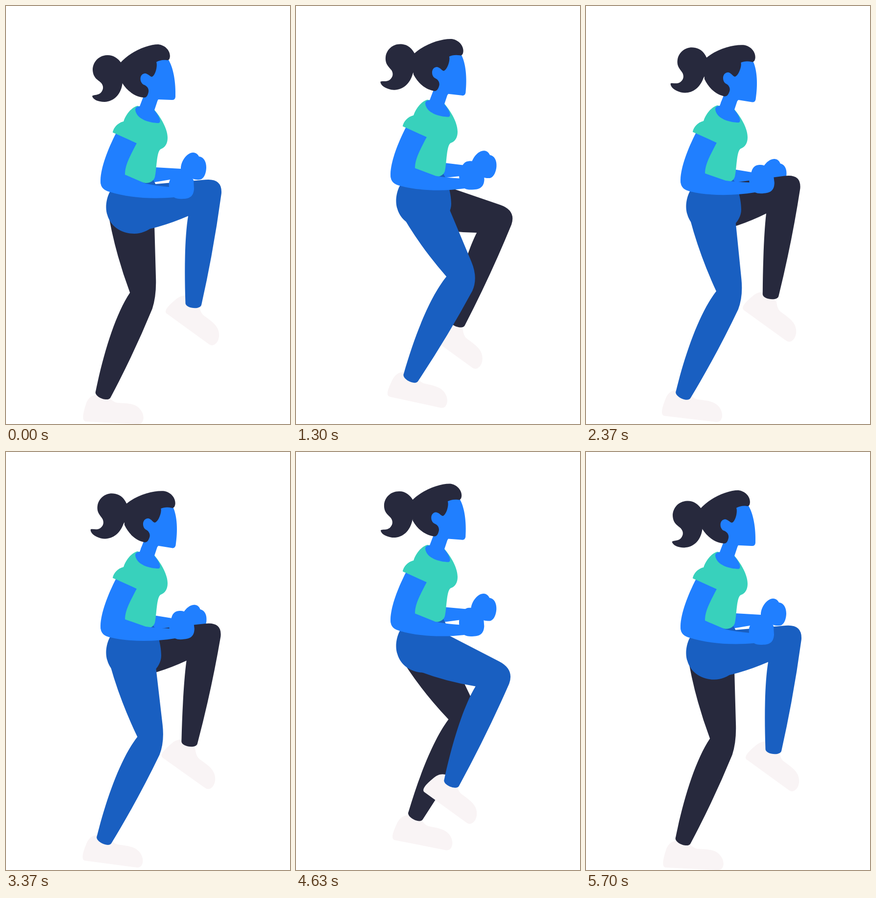
An HTML page for the animation above (5730 ms loop, 580 by 850 pixels).

```html
<!DOCTYPE html>
<html lang="en">
<head>
<meta charset="utf-8">
<title>High knees</title>
<style>
  html, body { margin: 0; width: 100%; height: 100%; overflow: hidden; background: #fff; }
  svg { display: block; width: 580px; height: 850px; }
  .ink { fill: #27293d; }
  .skin { fill: #207fff; }
  .pants { fill: #195fc1; }
  .shirt { fill: #38d1bc; }
  .shoe { fill: #f9f4f5; }
</style>
</head>
<body>
<svg viewBox="0 0 580 850">
  <defs>
    <path id="shoe" d="M-36 43C-44 42 -43 30 -36 8C-33 -2 -26 -10 -16 -11L10 -8C16 -2 20 4 30 5C48 6 62 6 72 15C81 23 83 34 81 40Q79 49 68 48Z"/>
  </defs>
  <g class="body">
    <path id="backArm" class="skin" d="M270 327L305 328L357 331C357 315 370 298 382 298C388 298 392 302 394 306C404 307 409 317 409 328C409 340 404 353 395 353C386 354 380 351 376 349L335 353L305 358L270 360Z"/>
  </g>
  <use id="farShoe" class="shoe" href="#shoe"/>
  <path id="farLeg" class="ink"/>
  <use id="nearShoe" class="shoe" href="#shoe"/>
  <path id="nearLeg" class="pants"/>
  <g class="body">
    <path class="pants" d="M212 378C203 395 203 415 207 425C214 450 238 463 262 463C290 463 317 440 317 415C317 390 307 360 298 350L230 345Z"/>
    <path class="shirt" d="M268 203C255 207 244 222 240 235C228 238 220 247 218 257L230 262L215 345L285 360C297 360 302 354 304 348C308 332 307 296 316 291C336 284 337 252 303 211Z"/>
    <path class="skin" d="M281 183L273 204C268 204 264 206 264 211C266 230 293 238 312 238C318 236 314 225 303 212L311 188Z"/>
    <path class="skin" d="M225 258L267 279C250 311 243 325 243 343L235 375L205 375C194 370 193 362 193 354C194 328 207 293 225 258Z"/>
    <path id="foreArm" class="skin" d="M205 334L243 343L285 361Q308 366 333 368C332 357 335 352 338 350C340 340 346 334 354 334C366 333 375 340 383 354L384 372C383 385 377 392 362 392Q350 393 343 389C300 393 250 390 212 378C198 374 193 368 193 354Z"/>
    <path class="shirt" d="M240 235C228 238 220 247 218 257L267 279L275 250Z"/>
    <g id="head">
      <path id="tail" class="ink" d="M237 118C228 104 216 99 206 100C188 101 177 115 177 130C178 147 188 150 194 156C200 163 199 170 194 176C188 182 180 180 176 183C177 190 188 195 201 195C222 194 236 178 238 155L244 135Z"/>
      <path class="skin" d="M300 104L331 108C342 125 347 155 346 185Q345 192 338 191L311 190L300 205L276 200L284 178L268 162L268 134Z"/>
      <path class="ink" d="M233 116C254 92 290 78 311 78C328 80 338 95 334 107Q332 111 328 110C320 109 312 111 307 114C310 122 305 142 298 144C293 143 291 138 284 137C272 138 272 155 281 160C290 163 292 170 291 175C289 185 285 187 280 186C262 184 247 172 237 156Z"/>
    </g>
  </g>
</svg>
<script>
  const CYCLE = 955;
  const LEG_LEAD = 15; // the legs move slightly ahead of the body
  const HANG = 0.41;   // how far a leg is raised in mid-jump
  const $ = id => document.getElementById(id);

  // Crease and knee are measured from the hip, ankle and foot on the stage
  const near = {
    down: { crease: [5, 174], knee: [60, 185], ankle: [195, 798], foot: [199, 793], tilt: 4 },
    up: { crease: [111, 20], knee: [181, -57], ankle: [382, 614], foot: [382, 609], tilt: 33 }
  };
  const far = {
    down: { crease: [-8, 176], knee: [46, 183], ankle: [195, 798], foot: [199, 802], tilt: 0 },
    up: { crease: [107, 16], knee: [179, -65], ankle: [376, 596], foot: [376, 602], tilt: 33 }
  };

  const mix = (a, b, k) => a + (b - a) * k;
  const lerp = (a, b, k) => [mix(a[0], b[0], k), mix(a[1], b[1], k)];
  const add = (a, d, k) => [a[0] + d[0] * k, a[1] + d[1] * k];
  const gap = (a, b) => Math.hypot(b[0] - a[0], b[1] - a[1]);
  const unit = (a, b) => [(b[0] - a[0]) / gap(a, b), (b[1] - a[1]) / gap(a, b)];
  const rear = d => [-d[1], d[0]];
  const pt = p => p[0].toFixed(2) + " " + p[1].toFixed(2);
  const ease = u => u < 0.5 ? 4 * u ** 3 : 1 - 4 * (1 - u) ** 3;

  // Eased value through four evenly spaced poses: raised, jump, standing, jump
  function track(time, ...poses) {
    const beat = ((time / CYCLE) % 1 + 1) % 1 * 4;
    const i = Math.floor(beat);
    return mix(poses[i], poses[(i + 1) % 4], ease(beat - i));
  }
  const raise = time => track(time, 1, HANG, 0, HANG);

  // Turns a limb vector from a to b, blending angle and length
  function swing(a, b, k) {
    const angle = mix(Math.atan2(a[0], a[1]), Math.atan2(b[0], b[1]), k);
    const length = mix(Math.hypot(...a), Math.hypot(...b), k);
    return [length * Math.sin(angle), length * Math.cos(angle)];
  }

  function legPath(hip, crease, knee, ankle) {
    const thighRear = rear(unit(hip, crease));
    const hipRear = add(hip, thighRear, 55);
    const hipFront = add(hip, rear(unit(hip, knee)), -42);
    const down = unit(lerp(crease, knee, 0.5), ankle);
    const back = rear(down);
    const cuff = add(ankle, down, -9);
    const heel = add(cuff, back, 16.5);
    const toe = add(cuff, back, -16.5);
    const calf = (gap(crease, heel) - 150) * 0.16;
    const shin = add(lerp(knee, toe, 0.12), back, -3);
    return "M" + pt(hipRear)
      + "Q" + [add(lerp(hipRear, crease, 0.5), thighRear, 10), crease].map(pt)
      + "C" + [add(lerp(crease, heel, 0.25), back, calf * 1.4),
               add(lerp(crease, heel, 0.65), back, calf), heel].map(pt)
      + "C" + [add(heel, down, 12), add(toe, down, 12), toe].map(pt)
      + "Q" + [add(lerp(toe, shin, 0.5), back, -5), shin].map(pt)
      + "Q" + [knee, lerp(knee, hipFront, 0.18)].map(pt)
      + "L" + pt(hipFront) + "Z";
  }

  function drawLeg(name, { down, up }, time, hip) {
    const k = raise(time);
    const joint = part => add(hip, swing(down[part], up[part], k), 1);
    const ankle = lerp(down.ankle, up.ankle, k);
    const [x, y] = lerp(down.foot, up.foot, k);
    const tilt = mix(down.tilt, up.tilt, track(time, 1, HANG, 0, 1));
    $(name + "Leg").setAttribute("d", legPath(hip, joint("crease"), joint("knee"), ankle));
    $(name + "Shoe").setAttribute("transform", `translate(${x} ${y}) rotate(${tilt})`);
  }

  const turn = (id, angle, x, y) => $(id).setAttribute("transform", `rotate(${angle} ${x} ${y})`);
  const bodies = document.querySelectorAll(".body");

  function draw(time) {
    const twist = raise(time - CYCLE / 2);
    const lift = track(time, 0, -18.5, 0, -18.5) - twist;
    const hip = [261, 407 + lift];
    bodies.forEach(b => b.setAttribute("transform", `translate(0 ${lift})`));
    turn("head", 7 * twist, 295, 192);
    turn("tail", 8 * Math.sqrt(twist), 240, 132);
    turn("foreArm", -4 * twist, 215, 355);
    turn("backArm", 6 * twist, 250, 340);
    drawLeg("far", far, time + LEG_LEAD - CYCLE / 2, hip);
    drawLeg("near", near, time + LEG_LEAD, hip);
  }

  const start = performance.now();
  function tick() {
    draw((performance.now() - start) % (6 * CYCLE));
    requestAnimationFrame(tick);
  }
  tick();
</script>
</body>
</html>
```
